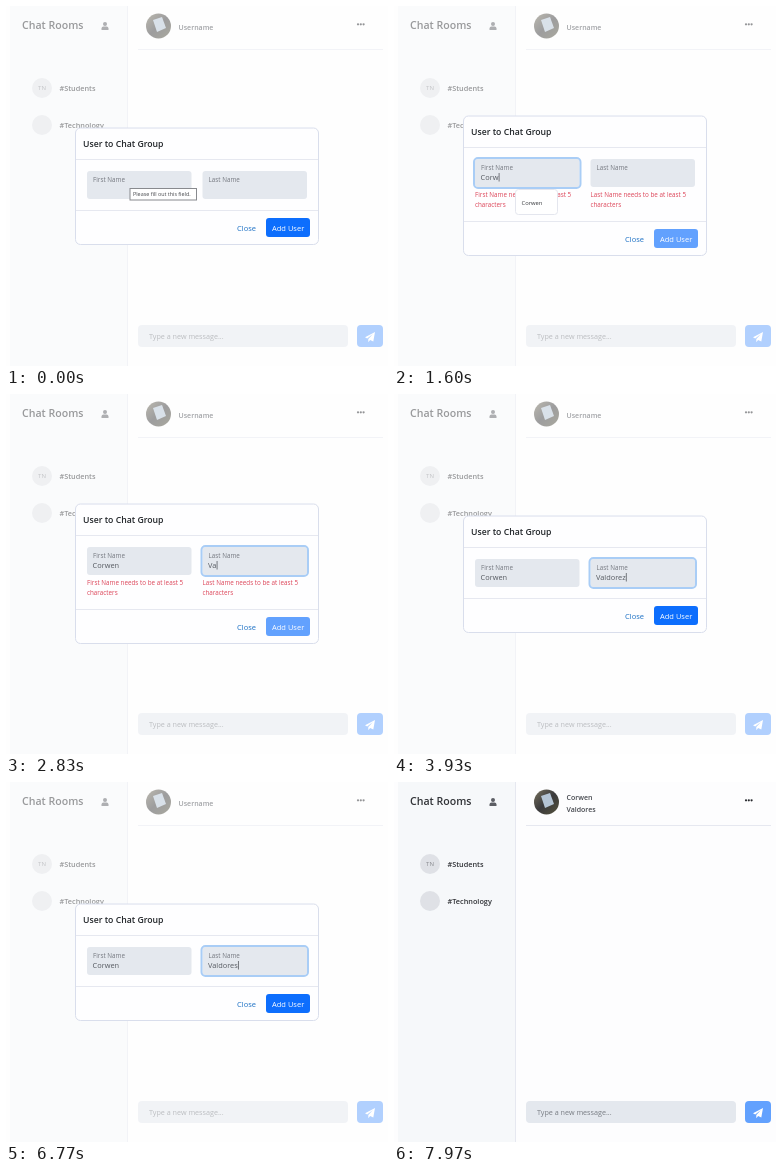
Write an HTML page that moves like this. It is 382 px wide and 360 px high and loops after 8 s.

```html
<!DOCTYPE html>
<html lang="en">
<head>
<meta charset="utf-8">
<title>Chat rooms</title>
<style>
  html, body { margin: 0; width: 100%; height: 100%; overflow: hidden; background: #fdfdfe; }
  svg { display: block; width: 382px; height: 360px; font-family: "Open Sans", "Noto Sans", sans-serif; }
  .semi { font-weight: 600; }
  .label { font-size: 6.3px; fill: #74777f; }
  .value { font-size: 7.4px; fill: #555960; white-space: pre; }
  .error { font-size: 6.3px; fill: #dc4458; }
  .field { fill: #e4e8ee; }
  .ring { fill: none; stroke: #a9cdf6; stroke-width: 2; }
  .rule { stroke: #e6e8f0; }
</style>
</head>
<body>
<svg viewBox="0 0 382 360">
  <defs>
    <linearGradient id="photo" x2="1" y2="1">
      <stop offset="0" stop-color="#77715e"/>
      <stop offset=".5" stop-color="#3a3a3c"/>
      <stop offset="1" stop-color="#55523c"/>
    </linearGradient>
  </defs>

  <rect width="382" height="360" fill="#fdfdfe"/>
  <rect x="4" width="117" height="360" fill="#f6f8fa"/>
  <path class="rule" d="M121.5 0V360M132 43.5H377"/>

  <g class="semi" fill="#303236">
    <text x="16" y="23" font-size="10.6">Chat Rooms</text>
    <text x="53.5" y="84.5" font-size="7.3">#Students</text>
    <text x="53.5" y="121.5" font-size="7.3">#Technology</text>
  </g>
  <g fill="#5c5e64">
    <circle cx="99" cy="18" r="2"/>
    <path d="M95.5 24v-1.5q0-2 2-2h3q2 0 2 2V24z"/>
  </g>
  <g fill="#dfe1e6">
    <circle cx="36" cy="82" r="10"/>
    <circle cx="36" cy="119" r="10"/>
  </g>
  <text x="36" y="84.3" font-size="6" text-anchor="middle" fill="#85878c">TN</text>

  <circle cx="152.5" cy="20" r="12.5" fill="url(#photo)"/>
  <path d="M147 14l9-3 4 11-9 4z" fill="#b4c4d4"/>
  <g class="semi" font-size="7" fill="#44474d">
    <text id="user" x="172.5" y="23.5">Username</text>
    <text id="name1" x="172.5" y="18">Corwen</text>
    <text id="name2" x="172.5" y="30">Valdores</text>
  </g>
  <g fill="#26282c">
    <circle cx="352" cy="18.3" r="1.1"/>
    <circle cx="354.8" cy="18.3" r="1.1"/>
    <circle cx="357.6" cy="18.3" r="1.1"/>
  </g>

  <rect class="field" x="132" y="319" width="210" height="22" rx="4"/>
  <text x="143" y="333" font-size="7.2" fill="#777b82">Type a new message...</text>
  <rect x="351" y="319" width="26" height="22" rx="4" fill="#62a1fe"/>
  <path d="M359 331.3l10-5.3-1.7 9.5-3.2-1.4-1.8 2.2v-3.2l4.6-5-5.7 4.4z" fill="#fff"/>

  <rect id="backdrop" width="382" height="360" fill="#fff"/>

  <g id="modal">
    <rect id="box" x="69.5" width="243" rx="5" fill="#fefeff" stroke="#d9deec"/>
    <g id="top">
      <text class="semi" x="77" y="141" font-size="8.7" fill="#212529">User to Chat Group</text>
      <path class="rule" d="M70 153.5H312"/>
      <g id="fields"></g>
    </g>
    <g id="bottom">
      <path class="rule" d="M70 204.5H312"/>
      <text x="231" y="225" font-size="7.5" fill="#1a6fc4">Close</text>
      <rect id="add" x="260" y="212" width="44" height="19" rx="3"/>
      <text x="266" y="224.6" font-size="7.5" fill="#fff">Add User</text>
    </g>
    <g id="popup">
      <rect x="121.5" y="183.5" width="42" height="25" rx="3" fill="#fff" stroke="#e4e6ee"/>
      <text x="127.5" y="198.6" font-size="5.8" fill="#36383c">Corwen</text>
    </g>
    <g id="tip">
      <rect x="124" y="182.5" width="66.5" height="11.5" fill="#fff" stroke="#888a8e"/>
      <text x="127" y="190.2" font-size="5.4" fill="#44464a">Please fill out this field.</text>
    </g>
  </g>
</svg>
<script>
const $ = id => document.getElementById(id);
const set = (id, attrs) => { for (const k in attrs) $(id).setAttribute(k, attrs[k]); };
const show = (id, on) => set(id, { opacity: +on });
const ramp = (t, from, to) => Math.min(1, Math.max(0, (t - from) / (to - from)));
const ease = p => p * p * (3 - 2 * p);

const LOOP = 8000;
const FIRST = { word: 'Corwen', keys: [1070, 1230, 1400, 1530, 1700, 1830] };
const LAST = { word: 'Valdorez', keys: [2570, 2770, 2930, 3100, 3230, 3330, 3430, 3530] };
const BACKSPACE = 4300, FIX = 4700;
const FOCUS = 430, TAB = 2270, HOVER = 6950, CLICK = 7560;
const presses = [FOCUS, ...FIRST.keys, TAB, ...LAST.keys, BACKSPACE, FIX];

$('fields').innerHTML = [['First', 81], ['Last', 196.5]].map(([name, x], i) => `
  <rect class="field" x="${x}" y="165" width="104.5" height="28" rx="3"/>
  <rect class="ring" id="ring${i}" x="${x - 1}" y="164" width="106.5" height="30" rx="4"/>
  <text class="label" x="${x + 6}" y="176.2">${name} Name</text>
  <text class="value" id="value${i}" x="${x + 5.5}" y="186"></text>
  <path id="caret${i}" stroke="#44474d" stroke-width=".7"/>
  <g class="error" id="error${i}">
    <text x="${x}" y="202.7">${name} Name needs to be at least 5</text>
    <text x="${x}" y="213.2">characters</text>
  </g>`).join('');

const typed = ({ word, keys }, t) => word.slice(0, keys.filter(k => k <= t).length);

function lastName(t) {
  const text = typed(LAST, t);
  if (t < BACKSPACE) return text;
  return text.slice(0, -1) + (t < FIX ? '' : 's');
}

function drawField(i, text, focus, blink, invalid) {
  const value = $('value' + i);
  if (value.textContent !== text) value.textContent = text;
  const x = +value.getAttribute('x') + (text ? value.getComputedTextLength() : 0) + .7;
  set('caret' + i, { d: `M${x} 179V187.5`, opacity: +(focus > 0 && blink) });
  show('ring' + i, focus);
  show('error' + i, invalid);
}

function buttonColor(t, invalid) {
  if (invalid) return '#62a1fe';
  const p = ramp(t, HOVER, HOVER + 150);
  const mix = (a, b) => Math.round(a + (b - a) * p);
  return `rgb(${mix(13, 11)},${mix(110, 94)},${mix(253, 215)})`;
}

function draw(t) {
  const first = typed(FIRST, t), last = lastName(t);
  const invalid = first.length > 0 && last.length < 5;
  const press = Math.max(0, ...presses.filter(k => k <= t));
  const blink = (t - press) % 1000 < 500;
  const tab = ramp(t, TAB, TAB + 150);

  drawField(0, first, t < TAB ? ramp(t, FOCUS, FOCUS + 150) : 1 - tab, blink && t < TAB, invalid);
  drawField(1, last, tab, blink, invalid);

  const up = invalid ? 12 : 0, down = invalid ? 11 : 0;
  set('box', { y: 122 - up, height: 116.5 + up + down });
  set('top', { transform: `translate(0 ${-up})` });
  set('bottom', { transform: `translate(0 ${down})` });
  set('add', { fill: buttonColor(t, invalid) });

  show('popup', t >= FIRST.keys[0] && t < 1870);
  show('tip', 1 - ramp(t, 230, 430));

  const leave = ease(ramp(t, CLICK, CLICK + 240));
  set('modal', { opacity: 1 - leave, transform: `translate(0 ${-22 * leave})` });
  show('backdrop', .5 * (1 - ramp(t, 7770, 7940)));

  const saved = t >= CLICK;
  show('user', !saved);
  show('name1', saved);
  show('name2', saved);
}

const start = performance.now();
function frame() {
  draw((performance.now() - start) % LOOP);
  requestAnimationFrame(frame);
}
frame();
</script>
</body>
</html>
```
